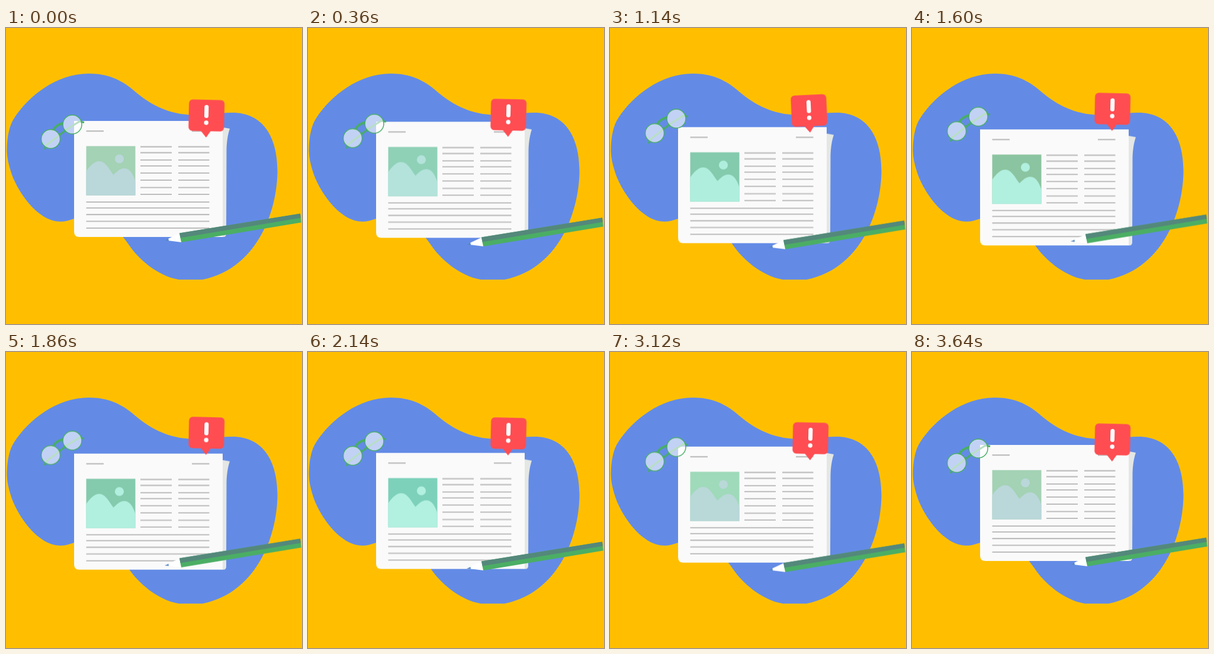
These frames come from a looping animation (500 px wide and 500 px high, 3.66 s). An HTML page:

```html
<!DOCTYPE html>
<html lang="en">
<head>
<meta charset="utf-8">
<title>Desk alert</title>
<style>
html, body { margin: 0; width: 100%; height: 100%; overflow: hidden; background: #ffbf00; }
svg { display: block; width: 100%; height: 100%; }
#tilt { transform-origin: 338px 184px; }
</style>
</head>
<body>
<svg viewBox="0 0 500 500">
  <path fill="#638be6" d="M1.5 205C2 185 5 165 14 152C38 115 85 77 140 77C172 77 195 88 214 104C240 127 270 144 308 146.5C330 147 355 143 382 143C435 143 458 185 458.5 240C459 300 430 405 332 425L292 425C255 419 222 388 208 367C190 340 165 316 135 317C118 319 108 327 92 327C55 327 22 280 10 248C4 230 1.5 218 1.5 205Z"/>

  <g id="paper">
    <path fill="#e4e7e3" d="M364 167.5L378 170C374 182 372.5 195 372.5 210L372 348Q372 353 367 353H360Z"/>
    <path fill="#fafafa" d="M115 157H366V353H124Q115 353 115 344Z"/>
    <path id="lines" stroke="#bdbdbd" stroke-width="2.2"/>
    <rect id="sky" x="135.5" y="199.5" width="83" height="83.3"/>
    <g id="hills">
      <path d="M135.5 242C143 231 150 225 157.5 225C168 225 174 238 181.5 248C188 242 192 237 200 237C209 237 215 247 218.5 259V282.8H135.5Z"/>
      <circle cx="191.5" cy="221" r="7.6"/>
    </g>
  </g>

  <g id="glasses" fill="none" stroke="#48ad66">
    <path stroke-width="3.2" d="M65.5 205L68 198L103 171L124 158L132 159.5"/>
    <path stroke-width="4" d="M78.5 174Q85 162.5 98 160.5"/>
    <g fill="#fff" fill-opacity=".61" stroke-width="1.5">
      <circle cx="75.5" cy="187.5" r="16"/>
      <circle cx="112" cy="163" r="16"/>
    </g>
  </g>

  <g id="alert"><g id="tilt"><g transform="rotate(1.3 338.5 148)">
    <path fill="#ff4d52" d="M329 173H347L338.8 185Z"/>
    <rect fill="#ff4d52" x="308.7" y="121.2" width="60" height="53" rx="6.5"/>
    <rect fill="#fff" x="335" y="130" width="7" height="22" rx="3.5"/>
    <circle fill="#fff" cx="338.5" cy="160" r="3.7"/>
  </g></g></g>

  <g id="pencil">
    <path fill="#5888c0" d="M275 355.7V359.5L268 359Z"/>
    <path fill="#fff" d="M294 346.5L297 362L275 359.3L274.3 355.8Z"/>
    <path fill="#4bae64" d="M293 346.5L497 313.5L498.7 328.5L296 362Z"/>
    <path fill="#54887b" d="M293 346.5L497 313.5L498 320.7L294.6 354.5Z"/>
  </g>
</svg>
<script>
const LOOP = 3660;
const SINE = 'cubic-bezier(.37,0,.63,1)';
const $ = id => document.getElementById(id);

const rule = (x1, x2, ys) => ys.map(y => `M${x1} ${y}H${x2}`).join('');
const column = [200.6, 210.6, 223, 233, 245, 257, 269.5, 281];
$('lines').setAttribute('d',
  rule(135.5, 165, [174.2]) + rule(314, 343.5, [174.2]) +
  rule(227, 280, column) + rule(291, 343.5, column) +
  rule(135.5, 343.5, [294, 304, 315.2, 326.5, 338]));

// steps: [time in ms, value]
function play(id, prop, steps, format, easing) {
  const frames = steps.map(([t, v]) => ({ offset: t / LOOP, [prop]: format(v), easing }));
  $(id).animate(frames, { duration: LOOP, iterations: Infinity });
}
const shift = v => `translateY(${v}px)`;
const turn = v => `rotate(${v}deg)`;
const color = v => v;

play('paper', 'transform', [[0, 0], [1790, 14.7], [LOOP, 0]], shift, SINE);
play('glasses', 'transform', [[0, 0], [1750, -13.5], [LOOP, 0]], shift, SINE);
play('alert', 'transform', [[0, 0], [1750, -11.4], [LOOP, 0]], shift, SINE);
play('pencil', 'transform', [[0, 0], [800, 16.3], [1720, 1], [2700, 16.3], [LOOP, 0]], shift, SINE);
play('tilt', 'transform', [[0, 0], [480, 0], [680, -9.7], [880, 8], [1080, -5], [1280, 0], [LOOP, 0]], turn, SINE);
play('sky', 'fill', [[0, '#a3d2b4'], [680, '#7dd0ba'], [1600, '#8bc4a0'], [2140, '#7dd1ba'],
  [2600, '#8195b8'], [3120, '#9fdaba'], [LOOP, '#a3d2b4']], color, 'linear');
play('hills', 'fill', [[0, '#bad7da'], [680, '#aeeddc'], [2140, '#b2f0e0'],
  [2600, '#b4e9de'], [3120, '#b9d8d8'], [LOOP, '#bad7da']], color, 'linear');
</script>
</body>
</html>
```
